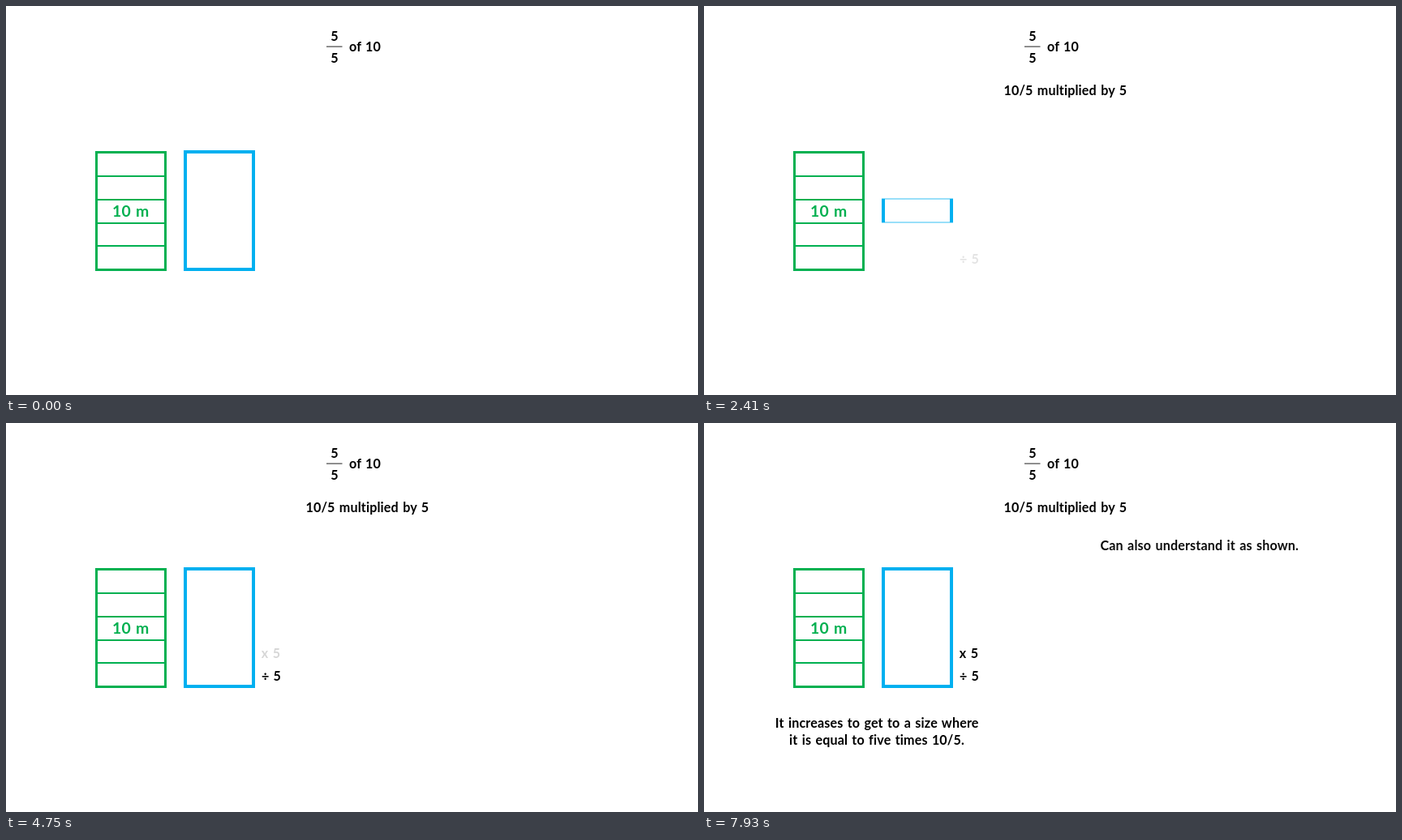
Write an HTML page that moves like this. It is 853 px wide and 480 px high and loops after 7.99 s.

```html
<!DOCTYPE html>
<html lang="en">
<head>
<meta charset="utf-8">
<title>Five fifths of ten</title>
<style>
  html, body { margin: 0; width: 100%; height: 100%; overflow: hidden; background: #fff; }
  svg { display: block; width: 853px; height: 480px; }
  text {
    font: bold 16.1px Lato, "Open Sans", sans-serif;
    letter-spacing: .15px;
    word-spacing: 1.2px;
    text-anchor: middle;
  }
  .length { font-size: 19.4px; fill: #00b050; }
  .fade { opacity: 0; }
</style>
</head>
<body>
<svg viewBox="0 0 853 480">
  <text x="405" y="43">5</text>
  <path d="M395 50.1H414.5" stroke="#444" stroke-width="1.2"/>
  <text x="405" y="70">5</text>
  <text x="442.5" y="56">of 10</text>

  <g fill="none" stroke="#00b050">
    <rect x="111.5" y="180.5" width="85" height="145" stroke-width="3"/>
    <path d="M112 210H196M112 239H196M112 268H196M112 296H196" stroke-width="2"/>
  </g>
  <text class="length" x="153.7" y="260">10 m</text>

  <rect id="bar" x="221" y="180" width="84" height="145" fill="none" stroke="#00b0f0" stroke-width="4"/>

  <text class="fade" id="product" x="445.3" y="110">10/5 multiplied by 5</text>
  <text class="fade" id="divide" x="327" y="318">÷ 5</text>
  <text class="fade" id="times" x="326.5" y="290">x 5</text>
  <g class="fade" id="reason">
    <text x="213.2" y="376">It increases to get to a size where</text>
    <text x="213" y="397">it is equal to five times 10/5.</text>
  </g>
  <text class="fade" id="closing" x="610.7" y="157">Can also understand it as shown.</text>
</svg>
<script>
  const LOOP = 7990, STEP = 60, EFFECT = 1140;
  const BAR_MIDDLE = 252.5, FIFTH = 1 / 5;
  const byId = id => document.getElementById(id);

  // Start and duration of each text's fade-in, in ms.
  const fades = {
    product: [0, 1080],
    divide: [2290, EFFECT],
    times: [4570, EFFECT],
    reason: [5710, EFFECT],
    closing: [6850, EFFECT]
  };

  const progress = (t, start, duration = EFFECT) =>
    Math.min(1, Math.max(0, (t - start) / duration));

  // Motion advances in 60 ms steps; the second half is shifted by 10 ms.
  function stepped(t) {
    const offset = t < 2410 ? 0 : 10;
    return offset + Math.floor((t - offset) / STEP + 1e-6) * STEP;
  }

  function draw(time) {
    const t = stepped(time % LOOP);
    for (const [id, [start, duration]] of Object.entries(fades)) {
      const p = progress(t, start, duration);
      byId(id).style.opacity = p < .1 ? 0 : p;
    }
    const shrink = progress(t, 1080) - progress(t, 3430);
    const scale = 1 - (1 - FIFTH) * shrink;
    byId("bar").setAttribute("transform",
      `translate(0 ${BAR_MIDDLE * (1 - scale)}) scale(1 ${scale})`);
  }

  const begin = performance.now();
  function tick() {
    draw(performance.now() - begin);
    requestAnimationFrame(tick);
  }
  tick();
</script>
</body>
</html>
```
